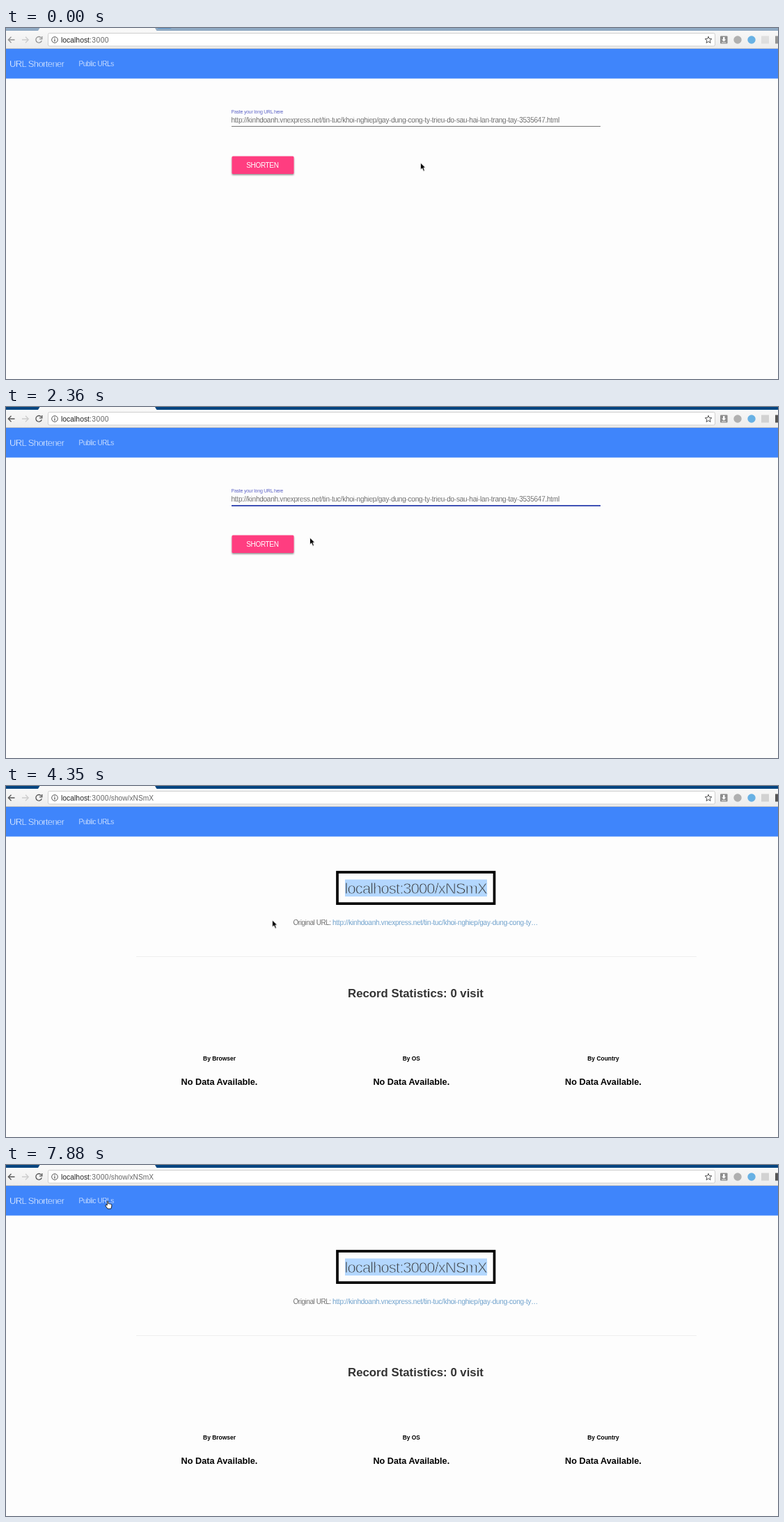
Animation, 1109 px wide and 505 px high, one loop 8000 ms. Source, as an HTML page:

```html
<!DOCTYPE html>
<html lang="en">
<head>
<meta charset="utf-8">
<title>URL Shortener</title>
<style>
  html, body { margin: 0; width: 100%; height: 100%; overflow: hidden; background: #fdfdfd; }
  svg { display: block; width: 100%; height: 100%; }
  text { font-family: "Liberation Sans", Arial, sans-serif; font-size: 10px; white-space: pre; }
  .bold { font-weight: bold; text-anchor: middle; }

  /* A thin outline in the background colour makes the type look light. */
  .light { stroke: #fdfdfd; stroke-width: .25; letter-spacing: -.24px; fill: #333; }
  .nav .light { fill: #fff; stroke: #3f85fb; }
  .line { fill: none; stroke: #555; stroke-width: 1.3; }

  .step { animation: 8s step-end infinite; }
  .frame-idle { animation-name: idle; }
  .frame-active { animation-name: active; }
  .form { animation-name: form; }
  .result { animation-name: result; }
  .selection { animation-name: selection; mix-blend-mode: multiply; }
  .focus { animation-name: focus; transform-origin: 589px 142px; }
  .caret { animation-name: caret; }
  .arrow { animation-name: arrow; }
  .hand { animation-name: hand; }

  @keyframes idle { 0% { visibility: visible } 18.75%, 100% { visibility: hidden } }
  @keyframes active { 0% { opacity: .6 } 18.75%, 100% { opacity: 1 } }
  @keyframes form { 0% { visibility: visible } 54.375%, 100% { visibility: hidden } }
  @keyframes result { 0% { visibility: hidden } 54.375%, 100% { visibility: visible } }
  @keyframes selection { 0%, 22%, 100% { opacity: 0 } 18.75% { opacity: 1 } }
  @keyframes focus {
    0%, 51.75%, 100% { transform: scaleX(0) }
    18.75% { transform: scaleX(.262) }
    22% { transform: scaleX(1) }
  }
  @keyframes caret {
    0%, 23.875%, 36.875%, 50%, 100% { opacity: 0 }
    18.75%, 31.375%, 42.5% { opacity: 1 }
  }
  @keyframes arrow {
    0% { transform: translate(595px, 193.5px); visibility: visible }
    25.75% { transform: translate(594.5px, 194.5px); visibility: visible }
    27.625% { transform: translate(470px, 189.5px); visibility: visible }
    29.5% { transform: translate(436px, 187.5px); visibility: visible }
    31.375% { transform: translate(399px, 185px); visibility: hidden }
    51.75% { transform: translate(382px, 192.5px); visibility: visible }
    90.375% { transform: translate(336.5px, 167.5px); visibility: visible }
    93% { transform: translate(220px, 91px); visibility: visible }
    94.875% { transform: translate(178px, 74px); visibility: visible }
    96.75% { transform: translate(152px, 60px); visibility: visible }
    98.5%, 100% { transform: translate(142px, 51px); visibility: hidden }
  }
  @keyframes hand {
    0% { transform: translate(399px, 184.5px); visibility: hidden }
    31.375% { transform: translate(398px, 184.5px); visibility: visible }
    33.25% { transform: translate(384.5px, 187px); visibility: visible }
    35% { transform: translate(346.5px, 191.5px); visibility: visible }
    36.875% { transform: translate(379.5px, 193px); visibility: visible }
    51.75% { transform: translate(379.5px, 193px); visibility: hidden }
    98.5%, 100% { transform: translate(142px, 51px); visibility: visible }
  }
</style>
</head>
<body>
<svg viewBox="0 0 1109 505" preserveAspectRatio="none">
  <defs>
    <linearGradient id="bar" x2="0" y2="1">
      <stop stop-color="#f8f8f8"/>
      <stop offset="1" stop-color="#ececec"/>
    </linearGradient>
    <filter id="shadow" x="-10%" y="-20%" width="120%" height="160%">
      <feDropShadow dx="0" dy="1.5" stdDeviation="1.1" flood-opacity=".45"/>
    </filter>
  </defs>
  <rect width="1109" height="505" fill="#fdfdfd"/>

  <!-- Browser frame -->
  <rect width="1109" height="4" fill="#004480"/>
  <g class="step frame-idle">
    <rect width="1109" height="4" fill="#8fa9c3"/>
    <path d="M217 0H238L236 1H219Z" fill="#5b92c6"/>
  </g>
  <path d="M46 4L48.500 0H214L216.500 4Z" fill="#f8f8f8"/>
  <rect y="4" width="1109" height="26" fill="url(#bar)"/>
  <rect y="29" width="1109" height="1" fill="#c4c4c4"/>
  <rect x="60.500" y="7.500" width="958" height="18.500" rx="2" fill="#fff" stroke="#cfcfcf"/>
  <g class="step frame-active">
    <path class="line" d="M12.500 17H3.500M7.500 12.800L3.300 17L7.500 21.200"/>
    <path class="line" d="M50.800 14.400A4.300 4.300 0 1 0 51.300 18.200M51.800 12V15.800H48"/>
    <rect x="1085" y="11.500" width="11" height="11" fill="#d2d2d2"/>
    <rect x="1105" y="11.500" width="4" height="11" fill="#555"/>
  </g>
  <path class="line" d="M23 17H32M28 12.800L32.200 17L28 21.200" style="stroke:#ccc"/>
  <circle class="line" cx="70" cy="17" r="4.300" style="stroke-width:1"/>
  <path class="line" d="M70 16.200V19.500M70 14.200V15.300"/>
  <path class="line" d="M1009 12.200L1010.300 15.500L1013.900 15.700L1011.100 18L1012 21.500L1009 19.500L1006 21.500L1006.900 18L1004.100 15.700L1007.700 15.500Z" style="stroke-width:1"/>
  <rect x="1026" y="11.500" width="10.500" height="11" rx="1" fill="#8c8c8c"/>
  <path d="M1030 13H1032.500V16.500H1034.500L1031.250 19.500L1028 16.500H1030ZM1028 20.500H1034.500V21.300H1028Z" fill="#fff"/>
  <circle cx="1051" cy="17" r="5.700" fill="#b0b0b0"/>
  <circle cx="1071" cy="17" r="5.700" fill="#68b1e4"/>
  <text x="79" y="20.800" style="font-size:10.400px" fill="#222">localhost</text>
  <g fill="#666">
    <text x="120" y="20.800" style="font-size:10.400px;letter-spacing:.4px">:3000</text>
    <text class="step result" x="148" y="20.800" style="font-size:10.200px">/show/xNSmX</text>
  </g>

  <!-- Navigation -->
  <g class="nav">
    <rect y="30" width="1109" height="42.700" fill="#3f85fb"/>
    <text class="light" x="5" y="56" style="font-size:13px;letter-spacing:-.6px;stroke-width:.4">URL Shortener</text>
    <text class="light" x="104.500" y="55" style="letter-spacing:-.43px">Public URLs</text>
  </g>

  <!-- Form page -->
  <g class="step form">
    <text class="light" x="323.500" y="123" style="font-size:7px;fill:#4149bd;stroke-width:.12">Paste your long URL here</text>
    <text class="light" x="323.500" y="136">http://kinhdoanh.vnexpress.net/tin-tuc/khoi-nghiep/gay-dung-cong-ty-trieu-do-sau-hai-lan-trang-tay-3535647.html</text>
    <rect class="step selection" x="409" y="126.500" width="57" height="12.500" fill="#d3daee"/>
    <rect class="step caret" x="794" y="126" width="1" height="12" fill="#222"/>
    <rect x="324" y="141" width="530" height="1" fill="#777"/>
    <rect class="step focus" x="324" y="141" width="530" height="2" fill="#3f51b5"/>
    <rect x="324.500" y="184.500" width="89" height="25.500" rx="1.500" fill="#ff3d80" filter="url(#shadow)"/>
    <text x="345.300" y="201" fill="#fff" style="letter-spacing:-.35px">SHORTEN</text>
  </g>

  <!-- Result page -->
  <g class="step result">
    <rect x="476" y="124" width="225.500" height="45.200" fill="none" stroke="#000" stroke-width="3.700"/>
    <rect x="487" y="134.500" width="204" height="24.500" fill="#b3d7fe"/>
    <text class="light" x="486.500" y="155" style="font-size:22px;letter-spacing:-.91px;stroke:#b3d7fe;stroke-width:.85">localhost:3000/xNSmX</text>
    <text class="light" x="412.500" y="199.500" style="letter-spacing:-.45px">Original URL:</text>
    <text class="light" x="469" y="199.500" style="fill:#337ab7">http://kinhdoanh.vnexpress.net/tin-tuc/khoi-nghiep/gay-dung-cong-ty…</text>
    <rect x="187" y="245" width="805" height="1" fill="#eee"/>
    <text class="bold" x="588.500" y="304" fill="#333" style="font-size:16.800px">Record Statistics: 0 visit</text>
    <g style="font-size:8.450px">
      <text class="bold" x="306.500" y="394.800" style="font-size:inherit">By Browser</text>
      <text class="bold" x="582.300" y="394.800" style="font-size:inherit">By OS</text>
      <text class="bold" x="858" y="394.800" style="font-size:inherit">By Country</text>
    </g>
    <g style="font-size:12.700px">
      <text class="bold" x="306.500" y="429.800" style="font-size:inherit">No Data Available.</text>
      <text class="bold" x="582.300" y="429.800" style="font-size:inherit">No Data Available.</text>
      <text class="bold" x="858" y="429.800" style="font-size:inherit">No Data Available.</text>
    </g>
  </g>

  <!-- Pointer -->
  <path class="step arrow" d="M.5 .5V10.500L2.900 8.300L4.700 12.400L6.500 11.600L4.800 7.700H8Z" fill="#000" stroke="#fff" stroke-width=".8"/>
  <path class="step hand" d="M3.300 7V1.500Q4.200 .2 5 1.500V4.800Q6 4 6.700 5Q7.700 4.400 8.300 5.400Q9.500 5 9.800 6.300V9L8.700 12H4L1 7.800Q.6 6.300 2 6.400Z" fill="#fff" stroke="#111" stroke-width=".9"/>
</svg>
</body>
</html>
```
